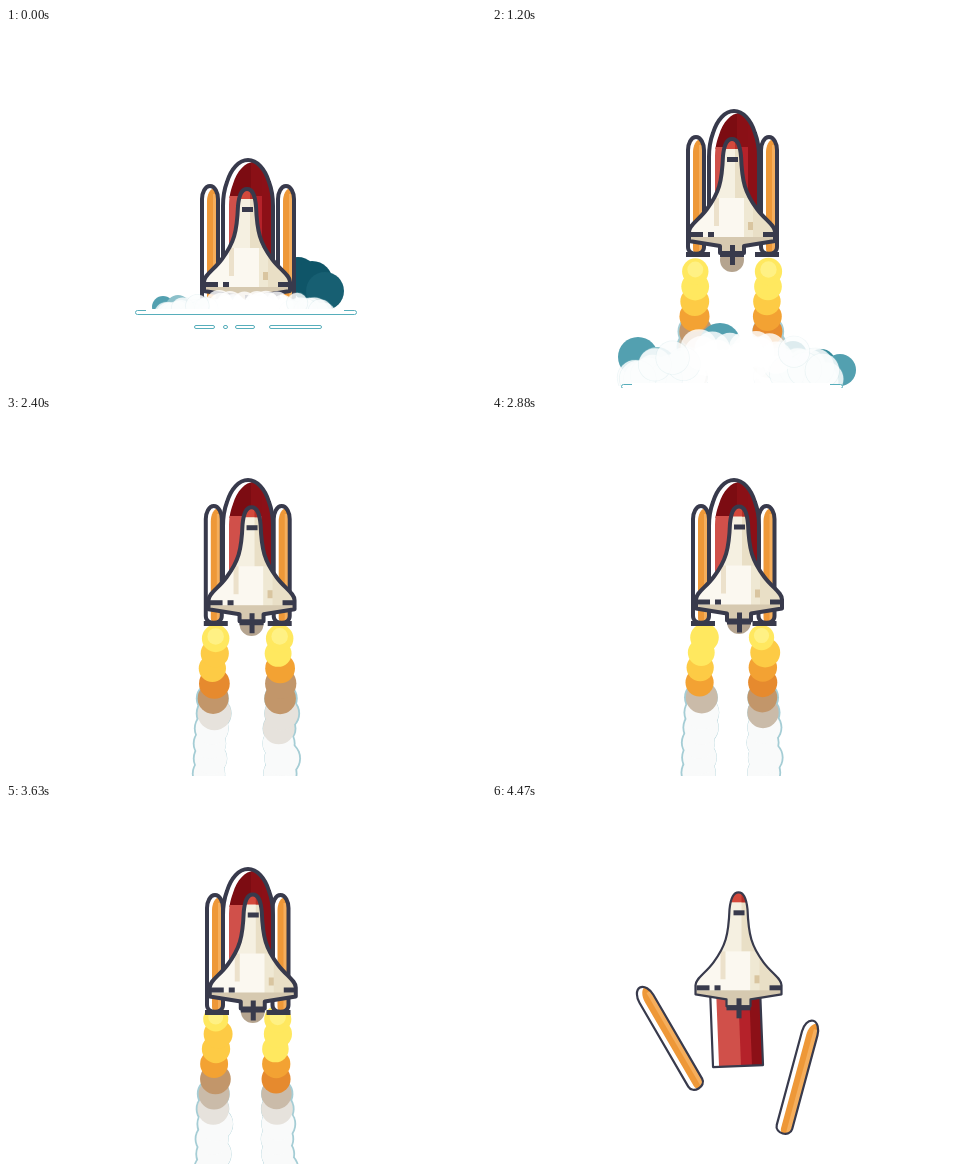
Recreate the animation shown at these times as an HTML page with a canvas. Size 480 px wide and 360 px high, loop 4.5 s.

```html
<!DOCTYPE html>
<html>
<head>
<meta charset="utf-8">
<style>
html, body { margin: 0; width: 100%; height: 100%; overflow: hidden; background: #fff; }
canvas { display: block; }
</style>
</head>
<body>
<canvas id="stage" width="480" height="360"></canvas>
<script>
const c = document.getElementById('stage').getContext('2d');
const LOOP = 4500, SPLIT = 3950, INK = '#383a4c', TEAL = '#53a0b0';

const clamp = v => Math.max(0, Math.min(1, v));
const mix = (a, b, k) => a + (b - a) * k;
const rand = n => { const v = Math.sin(n * 127.1 + 11.7) * 43758.5453; return v - Math.floor(v); };

// Piecewise linear track of [time, value] pairs.
function track(keys, t) {
  let i = 1;
  while (i < keys.length - 1 && t > keys[i][0]) i++;
  const [a, b] = [keys[i - 1], keys[i]];
  return mix(a[1], b[1], clamp((t - a[0]) / (b[0] - a[0])));
}

const TOP = [[0, 130], [510, 123], [780, 114], [1080, 94], [1200, 81], [1650, 62], [2880, 62], [3630, 63], [4470, 66]];
const GROUND = [[0, 284], [510, 298], [780, 313], [1080, 343], [1200, 358], [1650, 460]];
const LEFT = [[0, 204], [1200, 204], [1890, 206.5], [2880, 209]];
const RIGHT = [[0, 280], [1200, 277], [1890, 277], [2880, 274.5]];
const ORBITER = [[0, 241], [1200, 240], [1890, 244], [2880, 247], [4470, 246.5]];
const NOSE = [[0, 32], [1200, 31], [1890, 31], [2880, 29.5], [3630, 28.5]];
const HEIGHT = [[0, 24], [780, 51], [1200, 62]];
const SPREAD = [[0, 84], [780, 101], [1200, 103]];

const boosterPath = new Path2D('M0 2C5 2 8 9 8 15V112C8 121-8 121-8 112V15C-8 9-5 2 0 2Z');
const tankPath = new Path2D('M0 2C9 2 17 11 21 24C24 32 25 38 25 48V118H-25V48C-25 38-24 32-21 24C-17 11-9 2 0 2Z');
const orbiterPath = new Path2D('M0-1C6-1 8 6 9 16C10 42 13 53 25 69C33 80 43 85 43 92V101L12 106V113H-12V106L-43 101V92C-43 85-33 80-25 69C-13 53-10 42-9 16C-8 6-6-1 0-1Z');

function rect(x, y, w, h, color) {
  c.fillStyle = color;
  c.fillRect(x, y, w, h);
}

function circle(x, y, r, color) {
  c.fillStyle = color;
  c.beginPath();
  c.arc(x, y, Math.max(0, r), 0, 7);
  c.fill();
}

// Outlined shape whose inside is painted by a callback.
function part(path, x, y, angle, line, paint) {
  c.save();
  c.translate(x, y + 60);
  c.rotate(angle * Math.PI / 180);
  c.translate(0, -60);
  c.lineWidth = line;
  c.lineJoin = 'round';
  c.strokeStyle = INK;
  c.fillStyle = '#fff';
  c.fill(path);
  c.save();
  c.clip(path);
  paint();
  c.restore();
  c.stroke(path);
  c.restore();
}

function booster(x, y, angle, line) {
  part(boosterPath, x, y, angle, line, () => {
    c.translate(5, 2);
    c.fillStyle = '#ee9838';
    c.fill(boosterPath);
    rect(-2, 8, 6, 112, '#f5ae5c');
  });
}

function tank(x, y, angle, line) {
  part(tankPath, x, y, angle, line, () => {
    c.translate(6, 2);
    c.clip(tankPath);
    rect(-31, 0, 60, 38, '#7c0c12');
    rect(-31, 36, 60, 90, '#d0504a');
    rect(-3, 0, 40, 40, '#8a1016');
    rect(-3, 36, 40, 90, '#b5222a');
    rect(8, 10, 20, 115, '#8c1017');
  });
}

function orbiter(x, y, line) {
  part(orbiterPath, x, y, 0, line, () => {
    rect(-45, -3, 90, 120, '#f5f0e1');
    rect(3, -3, 45, 120, '#e9dfc6');
    rect(-45, 58, 57, 50, '#fbf8f0');
    rect(12, 58, 9, 40, '#efe8d3');
    rect(-18, 58, 5, 28, '#ece1cb');
    rect(16, 82, 5, 8, '#d9c5a0');
    rect(-45, 97, 90, 20, '#d6c9b0');
    rect(-10, -3, 20, 12, '#d4493c');
    rect(3, -3, 10, 12, '#b53029');
  });
  c.save();
  c.translate(x, y);
  rect(-5, 17, 11, 5, INK);
  rect(-42, 92, 13, 5, INK);
  rect(-24, 92, 6, 5, INK);
  rect(31, 92, 12, 5, INK);
  rect(-2, 105, 5, 20, INK);
  rect(-12, 112, 24, 5, INK);
  c.restore();
}

const HEAT = [[0, '#ffe85f'], [24, '#fdcb45'], [38, '#f3a233'], [52, '#e68a2e'], [66, '#c2966a'], [80, '#cabba9'], [94, '#e6e2dc'], [106, '#f9fafa']];

function plume(x, y, side, t, floor, cooling) {
  const puffs = [];
  for (let i = 0; i < 60; i++) {
    const birth = 430 + i * 60, age = (t - birth) * 0.25;
    if (age < 0 || age > 190 || birth > SPLIT) continue;
    const n = rand(i + side * 90), d = age - 6;
    puffs.push({
      d, x: x + (n - 0.5) * 4 + side * d * 0.02 - d * 0.01,
      y: y + 10 + d, r: 12 + n * 2 + Math.min(age, 100) * 0.035,
      heat: d * cooling + (n - 0.5) * 24
    });
  }
  c.save();
  c.beginPath();
  c.rect(0, 0, 480, floor);
  c.clip();
  c.globalAlpha = clamp(1 - (t - SPLIT) / 420);
  for (const p of puffs) if (p.d > 65) circle(p.x + side * 0.8, p.y, p.r + 1, '#a5cdd5');
  for (const p of puffs) {
    const stop = HEAT.filter(h => h[0] <= Math.max(0, p.heat)).pop();
    circle(p.x, p.y, p.r, stop[1]);
    if (p.heat < 16) circle(p.x, p.y - 2, p.r * 0.6, '#fff184');
  }
  c.restore();
}

// Teal puffs: start x, height, radius, then the same when grown, and colour.
const BLOBS = [
  [157, 5, 11, 146, 29, 20, TEAL],
  [172, 5, 12, 165, 20, 19, '#8cc0ca'],
  [230, 6, 10, 228, 42, 21, TEAL],
  [302, 20, 0, 301, 31, 14, '#34899a'],
  [318, 8, 0, 329, 22, 15, '#34899a'],
  [322, 8, 0, 348, 16, 16, TEAL]
];

function cloud(t, g) {
  const grow = clamp(t / 950), h = track(HEIGHT, t), w = track(SPREAD, t);
  c.save();
  c.beginPath();
  c.rect(0, 0, 480, g);
  c.clip();
  for (const [x0, h0, r0, x1, h1, r1, color] of BLOBS)
    circle(mix(x0, x1, grow), g - mix(h0, h1, grow), mix(r0, r1, grow), color);
  for (let i = 0; i < 46; i++) {
    const s = (i * 0.618 % 1) * 2 - 1, n = rand(i);
    const r = mix(10, 15, grow) + n * 4;
    const top = h * (1 - 0.5 * s * s) * (0.45 + 0.55 * rand(i + 50));
    const x = 241 + s * (w - r * 0.3), y = g - top + r;
    c.globalAlpha = 0.2;
    if (Math.abs(s) > 0.45) circle(x, y, r + 0.7, '#a9d0d8');
    c.globalAlpha = 0.82;
    circle(x, y, r, '#fff');
  }
  c.restore();
}

function darkSmoke(t, g) {
  c.globalAlpha = clamp(1.3 - t / 550);
  circle(292, g - 36, 19, '#0f5568');
  circle(306, g - 30, 21, '#0f5568');
  circle(319, g - 21, 19, '#175f72');
  c.globalAlpha = 1;
}

function pill(x, y, w, h) {
  c.beginPath();
  c.roundRect(x, y, w, h, h / 2);
  c.fillStyle = '#fff';
  c.fill();
  c.lineWidth = 1;
  c.strokeStyle = '#57aebb';
  c.stroke();
}

function ground(t, g) {
  pill(129.5, g - 1.5, 221, 4);
  rect(140, g - 3, 198, 4, '#fff');
  const late = t > 600;
  if (late) rect(265, g + 3, 50, 9, '#176b80');
  const dashes = late ? [[190, 17], [263, 53]] : [[188, 21], [217, 5], [229, 20], [263, 53]];
  for (const [x, w] of dashes) pill(x + 0.5, g + 13.5, w - 1, 3);
}

function draw(t) {
  const top = track(TOP, t), g = track(GROUND, t);
  const lx = track(LEFT, t), rx = track(RIGHT, t), ox = track(ORBITER, t);
  const u = clamp((t - SPLIT) / (4470 - SPLIT)), fall = u * u;
  const line = mix(4, 2.2, clamp(u * 3));
  const cruise = clamp((t - 1200) / 1700);
  rect(0, 0, 480, 360, '#fff');

  if (t < 720) darkSmoke(t, g);
  const nozzle = top + mix(146, 143, cruise), cooling = mix(1, 1.2, cruise);
  plume(lx + 2 * cruise, nozzle, -1, t, g, cooling);
  plume(rx - 1 - 2.5 * cruise, nozzle, 1, t, g, cooling);

  if (!u) {
    if (t < 1150) rect(214, top + 132, 54, 15, '#17627a');
    if (t > 600) circle(ox, top + mix(151, 144, cruise), 12, '#b5a48f');
    rect(lx - 10, top + 143, 24, 5, INK);
    rect(rx - 14, top + 143, 24, 5, INK);
  }

  booster(mix(lx, 173, fall), mix(top + 26, 184, fall), -34 * fall, line);
  booster(mix(rx, 310, fall), mix(top + 26, 228, fall), 17 * fall, line);
  tank(mix(242, 244, fall), mix(top, 154, fall), -2.5 * fall, line);
  orbiter(ox, mix(top + track(NOSE, t), 89, u), line);

  if (g < 450) {
    cloud(t, g);
    ground(t, g);
  }
}

// The picture advances sixteen times a second, on a 30 ms grid.
function pose(now) {
  const tick = 30 * Math.floor((now % LOOP) / 30);
  const step = Math.ceil(tick / 62.5) - 1;
  return step < 0 ? 0 : 30 + 30 * Math.floor(step * 62.5 / 30);
}

const start = performance.now();
function frame() {
  draw(pose(performance.now() - start));
  requestAnimationFrame(frame);
}
frame();
</script>
</body>
</html>
```
